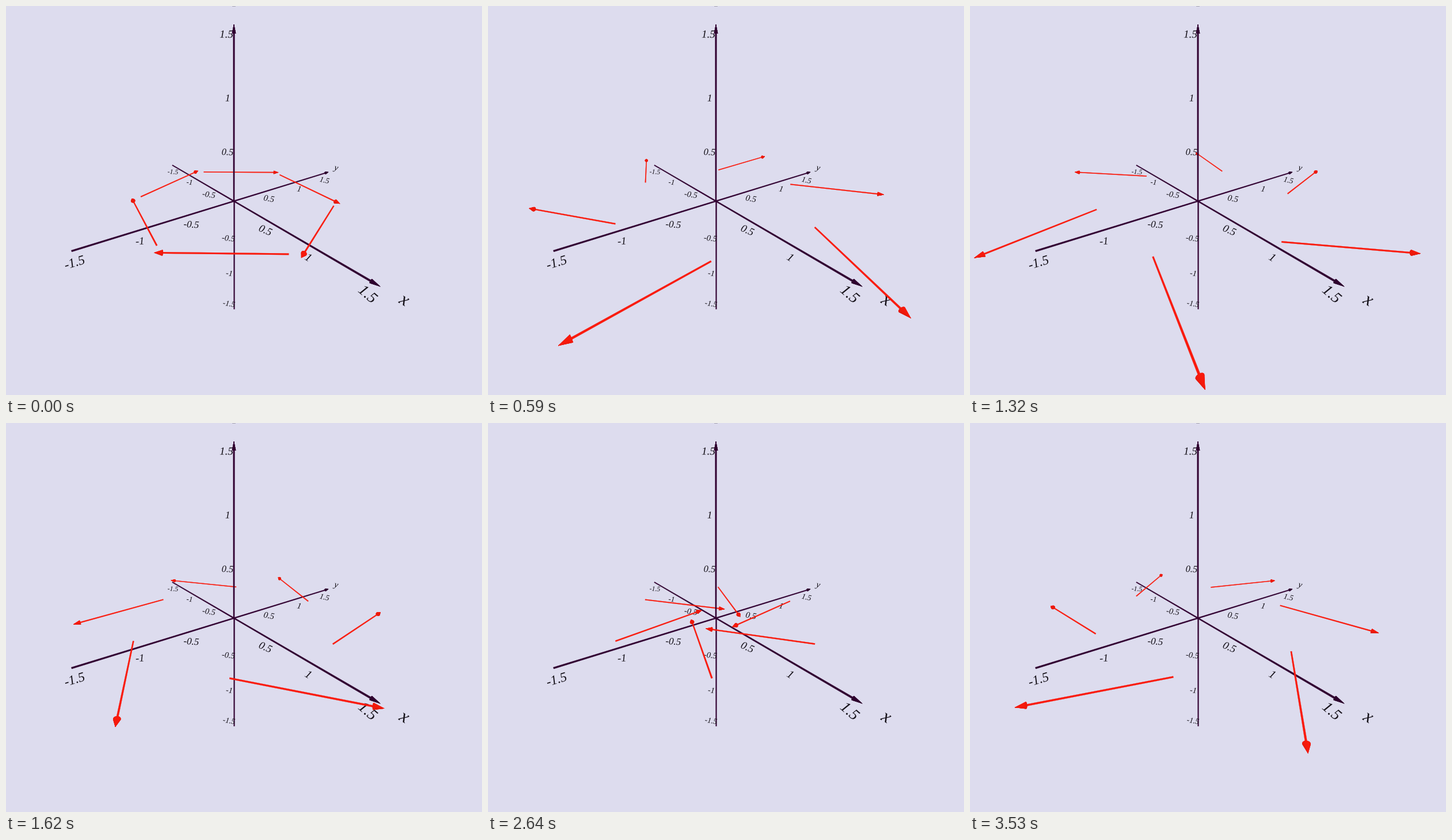
A matplotlib script that plays this animation: 827x677 px, repeating every 3.55 s.

```python
import numpy as np
import matplotlib.pyplot as plt
from matplotlib.animation import FuncAnimation
from matplotlib.collections import PolyCollection
from matplotlib.colors import to_rgb
from matplotlib.patches import PathPatch
from matplotlib.path import Path
from matplotlib.textpath import TextPath
from matplotlib.transforms import Affine2D

W, H, DPI = 827, 677, 64
LOOP, TICK = 3550, 10
PAPER, INK, TEXT, RED = "#dddcee", "#300030", "#141018", "#fa1a0c"

# Perspective camera: screen = ORIGIN + p @ PLANE / (1 + p @ DEPTH)
ORIGIN = np.array([396.0, 339.6])
PLANE = np.array([[98.96, 57.86], [136.3, -42.0], [0.0, -152.8]])
DEPTH = np.array([-0.2564, 0.1864, -0.148])

HEAD = 0.06      # arrowhead length in world units
STEP = 0.15      # radians the ring turns per pose
TAIL0, AIM0 = np.radians([-12.3, -127.0])
REACH = 0.99

# Moments (ms) at which the pose advances
CHANGES = [150, 290, 440, 590, 730, 880, 1030, 1170, 1320, 1470, 1620, 1760,
           1910, 2060, 2200, 2350, 2490, 2640, 2790, 2930, 3080, 3230, 3380,
           3530]

# text, centre x, centre y, size in px, rotation in degrees
LABELS = [
    ("1.5", 383, 49, 19, 0), ("1", 384.5, 160, 17.5, 0),
    ("0.5", 385, 254, 16.5, -2), ("-0.5", 386.5, 404, 14.5, -6),
    ("-1", 387.5, 465, 14, -7), ("-1.5", 387.5, 518, 13.5, -9),
    ("-1.5", 119, 446, 23, 17), ("-1", 232, 409, 18.5, 4),
    ("-0.5", 322, 380, 17, -4), ("0.5", 457, 335, 15, -10),
    ("1", 509, 318, 14.5, -12), ("1.5", 553.5, 303, 13.5, -13),
    ("y", 572.5, 284, 15, -14),
    ("-1.5", 290, 288.5, 11.8, -3), ("-1", 318.5, 306.5, 13, -6),
    ("-0.5", 352.5, 328, 14.5, -8), ("0.5", 451, 390, 18.5, -24),
    ("1", 525, 437, 20, -32), ("1.5", 629, 501, 27, -41),
    ("x", 691, 513, 32, -30),
]


def depth(p):
    return 1 + np.asarray(p) @ DEPTH


def project(p):
    p = np.asarray(p, float)
    return ORIGIN + p @ PLANE / depth(p)[..., None]


def shaft(a, b, width):
    """Strip from a to b, tapering with distance."""
    pa, pb = project(a), project(b)
    d = pb - pa
    n = np.array([-d[1], d[0]]) / np.hypot(*d) / 2
    na, nb = n * width / depth(a), n * width / depth(b)
    return [pa + na, pb + nb, pb - nb, pa - na]


def cone(tip, aim, radius, color, sides=14):
    """Shaded faces of a cone, far ones first."""
    ref = [0, 0, 1] if abs(aim[2]) < 0.9 else [1, 0, 0]
    e1 = np.cross(ref, aim)
    e1 = e1 / np.linalg.norm(e1)
    e2 = np.cross(aim, e1)
    ang = np.linspace(0, 2 * np.pi, sides + 1)[:, None]
    rim = tip - HEAD * aim + radius * (np.cos(ang) * e1 + np.sin(ang) * e2)
    faces = [(rim[:-1], 0.95)]
    for i in range(sides):
        shade = 0.95 + 0.05 * np.sin(ang[i, 0] + 0.6)
        faces.append((np.array([tip, rim[i], rim[i + 1]]), shade))
    faces.sort(key=lambda f: -depth(f[0]).mean())
    rgb = np.array(to_rgb(color))
    return [project(f) for f, _ in faces], [rgb * s for _, s in faces]


def arrow(tail, tip, width, radius, color):
    tail, tip = np.asarray(tail, float), np.asarray(tip, float)
    aim = (tip - tail) / np.linalg.norm(tip - tail)
    polys, colors = cone(tip, aim, radius, color)
    body = shaft(tail, tip - 0.9 * HEAD * aim, width)
    return [body] + polys, [np.array(to_rgb(color))] + colors


def ring(pose):
    """Six arrows on the unit circle; they spin three times as fast as it."""
    polys, colors = [], []
    for k in range(6):
        t = TAIL0 + STEP * pose + k * np.pi / 3
        a = AIM0 + 3 * STEP * pose + k * np.pi / 3
        tail = np.array([np.cos(t), np.sin(t), 0])
        tip = tail + REACH * np.array([np.cos(a), np.sin(a), 0])
        p, c = arrow(tail, tip, 1.95, 0.021, RED)
        polys += p
        colors += c
    return polys, colors


def label_path(text, x, y, size, rot):
    path = TextPath((0, 0), text, size=size,
                    prop={"family": "Liberation Serif", "style": "italic"})
    box = path.get_extents()
    move = Affine2D().translate(-(box.x0 + box.x1) / 2, -(box.y0 + box.y1) / 2)
    return move.rotate_deg(rot).scale(1, -1).translate(x, y).transform_path(path)


fig = plt.figure(figsize=(W / DPI, H / DPI), dpi=DPI, facecolor=PAPER)
ax = fig.add_axes([0, 0, 1, 1])
ax.set_xlim(0, W)
ax.set_ylim(H, 0)
ax.axis("off")


def add_polys(polys, colors, z):
    coll = PolyCollection(polys, facecolors=colors, edgecolors="face",
                          linewidths=0.3, zorder=z)
    ax.add_collection(coll, autolim=False)
    return coll


def add_axis(tail, tip, z):
    add_polys(*arrow(tail, tip, 2.15, 0.015, INK), z)


add_axis((-1.496, 0, 0), (1.548, 0, 0), 1)
add_axis((0, -1.494, 0), (0, 1.551, 0), 1)
add_polys([shaft((0, 0, 0), (0, 0, -1.5), 2.15)], [to_rgb(INK)], 1)
# The upper half of the vertical axis stands in front of the ring's far side
add_axis((0, 0, 0), (0, 0, 1.55), 4)

labels = Path.make_compound_path(*[label_path(*row) for row in LABELS])
ax.add_patch(PathPatch(labels, facecolor=TEXT, linewidth=0, zorder=2))
ax.plot([392.5, 397.5], [0.3, 0.3], color=TEXT, alpha=0.35, lw=0.9, zorder=2)

arrows = add_polys(*ring(0), 3)


def update(i):
    pose = int(np.searchsorted(CHANGES, i * TICK, side="right"))
    polys, colors = ring(pose)
    arrows.set_verts(polys)
    arrows.set_facecolor(colors)
    return [arrows]


anim = FuncAnimation(fig, update, frames=LOOP // TICK, interval=TICK,
                     init_func=lambda: update(0), repeat=True, repeat_delay=0)
plt.show()
```
